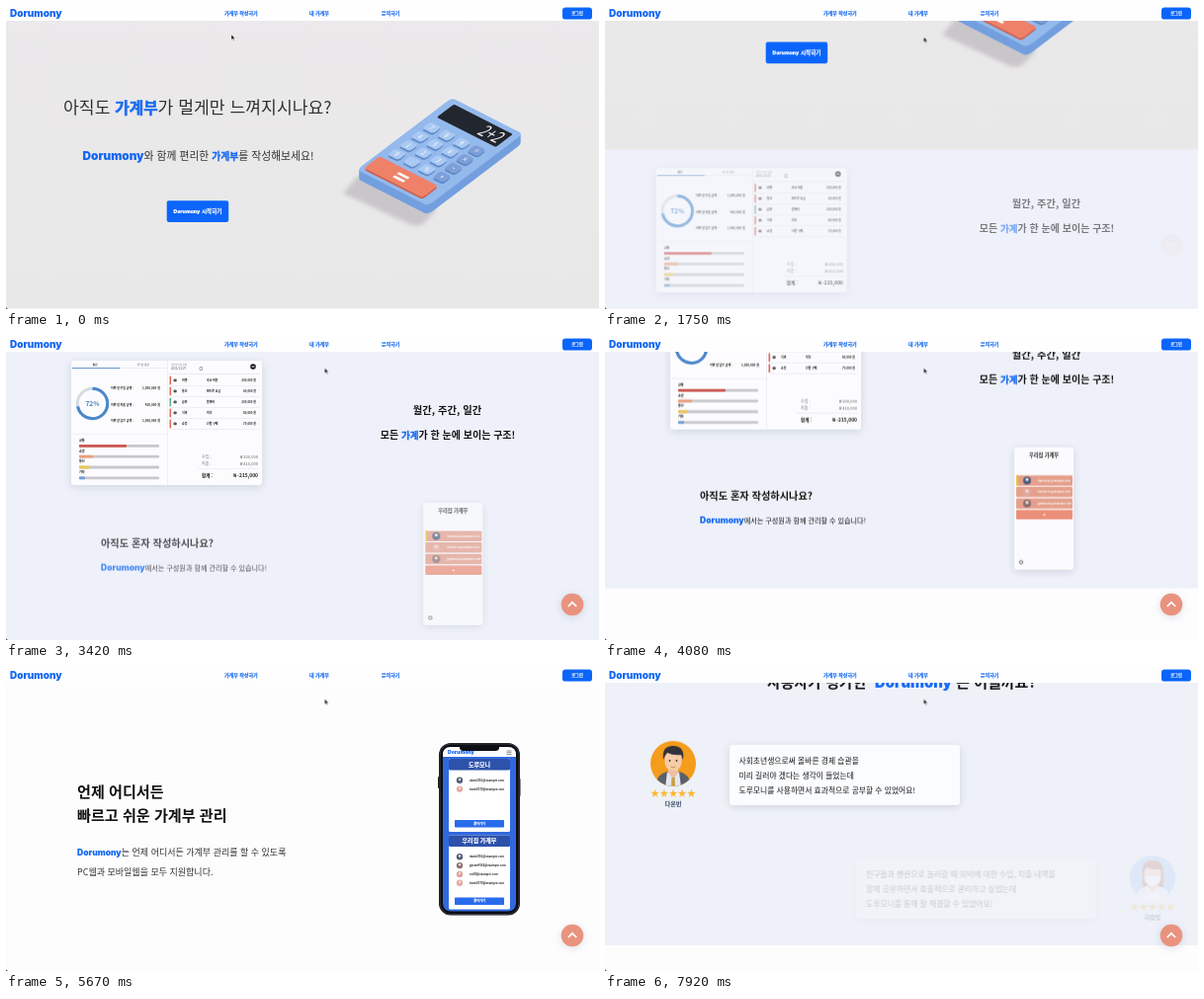
Write an HTML page that moves like this. It is 600x307 px and loops after 8 s.

```html
<!DOCTYPE html>
<html lang="ko">
<head>
<meta charset="utf-8">
<title>Dorumony</title>
<style>
html, body { margin: 0; width: 100%; height: 100%; overflow: hidden; background: #fefdfe; }
svg { display: block; width: 100vw; height: 100vh; }
text { font-family: "Noto Sans CJK KR", "Noto Sans CJK", sans-serif; }
.brand { font-family: Inter, sans-serif; font-weight: 900; fill: #1267f4; stroke: none; }
.blue { font-weight: 900; fill: #1a6cf0; stroke: #1a6cf0; stroke-width: .035em; }
.white { font-weight: 900; fill: #fff; stroke: #fff; stroke-width: .03em; }
.brand.white { fill: #fff; }
.light { font-weight: 300; fill: #303033; }
.bold { font-weight: 700; }
.panel { filter: drop-shadow(0 2px 4px #30406028); }

#page, #cursor, #up, .reveal { animation: 8s linear infinite; }
#page { animation-name: scroll; }
#cursor { animation-name: point; }
#up { animation-name: up; }
.budget { animation-name: budget; }
.group { animation-name: group; }
.mobile { animation-name: mobile; }
.first { animation-name: first; }
.second { animation-name: second; }
.right { --from: translate(-30px, 0); }
.left { --from: translate(30px, 0); }
.down { --from: translate(0, -30px); }

@keyframes scroll {
  0%, 11.25% { transform: translateY(0); }
  17.1% { transform: translateY(-65px); }
  21.9% { transform: translateY(-161px); }
  26.25%, 33.75% { transform: translateY(-195px); }
  42.75% { transform: translateY(-301px); }
  47.5% { transform: translateY(-318px); }
  51.25% { transform: translateY(-360px); }
  54.5% { transform: translateY(-450px); }
  59.4% { transform: translateY(-580px); }
  63.75%, 74.4% { transform: translateY(-602px); }
  84.75% { transform: translateY(-755px); }
  89.6% { transform: translateY(-858px); }
  92.5% { transform: translateY(-868px); }
  95.6% { transform: translateY(-872px); }
  99% { transform: translateY(-943px); }
  100% { transform: translateY(-955px); }
}
@keyframes point {
  0%, 2% { transform: translate(228px, 29px); animation-timing-function: ease-in-out; }
  11%, 100% { transform: translate(322.5px, 31.5px); }
}
@keyframes up {
  0%, 21.2% { opacity: 0; transform: translateY(-30px); animation-timing-function: ease; }
  32%, 100% { opacity: 1; transform: none; }
}
@keyframes budget {
  0%, 17.3% { opacity: 0; transform: var(--from); animation-timing-function: ease; }
  32.3%, 100% { opacity: 1; transform: none; }
}
@keyframes group {
  0%, 36.3% { opacity: 0; transform: var(--from); animation-timing-function: ease; }
  51.3%, 100% { opacity: 1; transform: none; }
}
@keyframes mobile {
  0%, 54.5% { opacity: 0; transform: var(--from); animation-timing-function: ease; }
  69.5%, 100% { opacity: 1; transform: none; }
}
@keyframes first {
  0%, 85% { opacity: 0; transform: var(--from); animation-timing-function: ease; }
  99%, 100% { opacity: 1; transform: none; }
}
@keyframes second {
  0%, 96.9% { opacity: 0; transform: var(--from); }
  100% { opacity: .26; transform: translate(22px, 0); }
}
</style>
</head>
<body>
<svg id="stage" viewBox="0 0 600 307" preserveAspectRatio="none"></svg>
<script>
const BRAND = 'Dorumony', BRAND_KO = '도루모니', BLUE = '#0b65fa';

// Text is placed by the vertical middle of its glyphs.
const text = (x, y, size, str, cls = '', fill = '#111', anchor = 'start') =>
  `<text x="${x}" y="${y + size * .36}" font-size="${size}" class="${cls}" fill="${fill}" text-anchor="${anchor}">${str}</text>`;
const span = (str, cls, size) => `<tspan class="${cls}" font-size="${size}">${str}</tspan>`;
const brand = size => span(BRAND, 'brand', size);
const rect = (x, y, w, h, fill, r = 0, extra = '') =>
  `<rect x="${x}" y="${y}" width="${w}" height="${h}" rx="${r}" fill="${fill}" ${extra}/>`;
const circle = (x, y, r, fill, extra = '') => `<circle cx="${x}" cy="${y}" r="${r}" fill="${fill}" ${extra}/>`;
const path = (d, fill, extra = '') => `<path d="${d}" fill="${fill}" ${extra}/>`;
const at = (x, y, ...parts) => `<g transform="translate(${x} ${y})">${parts.join('')}</g>`;
const reveal = (cls, ...parts) => `<g class="reveal ${cls}">${parts.join('')}</g>`;
const each = (items, draw) => items.map(draw).join('');
const range = n => [...Array(n).keys()];

function calculator() {
  const plane = 'matrix(.72 .365 -.96 .73 451 93)';
  const slab = range(10).reverse().map(i =>
    `<g transform="translate(0 ${i})"><g transform="${plane}">${rect(0, 0, 100, 100, i ? '#739fde' : '#94b9ec', 5)}</g></g>`).join('');
  const keys = each(range(16), i => {
    const col = i % 4, x = 9 + col * 21, y = 29 + (i >> 2) * 12.2;
    const top = col === 3 ? '#7f9fd8' : '#aac9f3';
    return rect(x + 1.6, y + 1.6, 15, 8.8, '#5f88c6', 3) + rect(x, y, 15, 8.8, top, 3) +
      text(x + 7.5, y + 4.4, 6, '789÷456×123−0.%+'[i], 'bold', '#eef5ff', 'middle');
  });
  return path('M341 190L356 172L436 206L424 219Q418 225 408 221Z', '#c9c6ca', 'filter="url(#soft)"') + slab +
    `<g transform="${plane}">` +
    rect(9, 4.5, 83, 18, '#22262e', 2) +
    text(74, 13.5, 16.5, '2+2', '', '#f4f6f8', 'middle') + keys +
    rect(6, 80.5, 82, 16.5, '#c95f4d', 3) + rect(4, 79, 82, 16.5, '#ef8169', 3) +
    rect(38, 84, 15, 2.4, '#fff') + rect(38, 88.5, 15, 2.4, '#fff') + '</g>';
}

function dashboard() {
  const totals = [['수입', '1,000,000'], ['지출', '410,000'], ['남은', '1,000,000']];
  const bars = [['교통', 48, '#cf5752'], ['쇼핑', 14, '#ef9c7c'], ['통신', 10, '#e9c75a'], ['기타', 6, '#6d9dd6']];
  const rows = [['여행', '숙소 비용', '200,000', '#e0685c'], ['통신', '핸드폰 요금', '60,000', '#e0685c'],
    ['급여', '알바비', '200,000', '#5fae8c'], ['식비', '외식', '80,000', '#e0685c'], ['쇼핑', '신발 구매', '70,000', '#e0685c']];
  const ring = 'fill="none" stroke-width="3"';
  return at(66, 325,
    rect(0, 0, 193, 126, '#fcfcfe', 3, 'class="panel"'),
    text(24, 4, 2.8, '월간', 'bold', '#333', 'middle'), text(73, 4, 2.8, '한 달 설정', '', '#555', 'middle'),
    rect(1, 7.5, 96, .4, '#ccd'), rect(1, 7.2, 48, .8, '#4c81c4'),
    rect(97.5, 0, .5, 126, '#dfe2ea'), rect(0, 74, 97, .5, '#dfe2ea'),
    `<circle cx="21.5" cy="43.5" r="15.2" stroke="#d4dbe4" ${ring}/>`,
    `<circle cx="21.5" cy="43.5" r="15.2" stroke="#4a88cb" ${ring} pathLength="100" stroke-dasharray="72 28" transform="rotate(-90 21.5 43.5)"/>`,
    text(21.5, 43.5, 6.6, '72%', 'bold', '#4a80bd', 'middle'),
    each(totals, ([name, sum], i) => text(40, 28 + i * 16.5, 2.9, `이번 달 ${name} 금액 :`, 'bold') +
      text(90, 28 + i * 16.5, 3, sum + ' 원', 'bold', '#222', 'end')),
    each(bars, ([name, w, color], i) => text(8, 81 + i * 10.6, 3.1, name, 'bold') +
      rect(8, 85 + i * 10.8, 81, 2.8, '#c8c7c9', .8) + rect(8, 85 + i * 10.8, w, 2.8, color, .8)),
    text(101, 4, 2.3, '이달의 지출 날짜', '', '#888'), text(101, 8.3, 2.9, '2021/11/27', '', '#444'),
    rect(130, 6.5, 2.6, 3, 'none', .4, 'stroke="#555" stroke-width=".5"'),
    circle(184, 6, 2.8, '#111'), rect(182.4, 5.6, 3.2, 1, '#fff', .5), rect(98, 13.5, 93, .4, '#ccd'),
    each(rows, ([kind, note, sum, color], i) => {
      const y = 20 + i * 11;
      return rect(99.5, y - 4.3, 1.6, 8.6, color) + rect(103.5, y - 1.4, 3.2, 2.6, '#555', .8) +
        text(112, y, 2.9, kind, 'bold') + text(137, y, 2.9, note, 'bold') +
        text(187, y, 2.9, sum + ' 원', 'bold', '#222', 'end') + rect(101, y + 5, 89, .35, '#d5d7de');
    }),
    text(132, 97.5, 4.1, '수입 :', '', '#777'), text(189, 97.5, 4.1, '₩ 200,000', '', '#666', 'end'),
    text(132, 104.5, 4.1, '지출 :', '', '#777'), text(189, 104.5, 4.1, '₩ 410,000', '', '#666', 'end'),
    rect(128, 109.5, 62, .35, '#d5d7de'),
    text(132, 116.5, 4.6, '합계 :', 'bold'), text(189, 116.5, 4.9, '₩ -215,000', 'bold', '#222', 'end'));
}

const mails = ['dami2051@example.com', 'bomi0370@example.com', 'garam4162@example.com', 'sol80@example.com'];
const tints = ['#4b5f80', '#e3aba5', '#8a6f72', '#dba39d'];
const user = (x, y, i, r, size, fill, gap) => circle(x, y, r, tints[i]) + circle(x, y - r * .25, r * .4, '#f3dccb') +
  text(x + gap, y, size, mails[i], 'bold', fill);

function groupCard() {
  return at(414, 469,
    rect(0, 0, 60, 124, '#fbfbfd', 3, 'class="panel"'),
    text(30, 8.2, 5.2, '우리집 가계부', 'bold', '#222', 'middle'),
    each(range(3), i => rect(2, 28.5 + i * 11.6, 57, 10.5, '#e5a08c', 1) +
      user(13, 33.7 + i * 11.6, i, 4, 2.6, '#fff', 11)),
    rect(2, 28.5, 1.8, 10.5, '#f0c332'),
    rect(2, 63.5, 57, 9.5, '#ec8f79', 1), text(30.5, 68.2, 5, '+', 'bold', '#fff', 'middle'),
    circle(7, 116.5, 1.7, 'none', 'stroke="#333" stroke-width=".7"'));
}

function phone() {
  const list = (y, h, title, ids) => rect(448, y, 62, h, '#fff', 1.5) +
    rect(448, y, 62, 11.5, '#2d52aa', 1.5) + text(479, y + 5.6, 6, title, 'white', '#fff', 'middle') +
    each(ids, (id, i) => user(459, y + 21.8 + i * 8.8, id, 3.2, 2.8, '#222', 10)) +
    rect(454, y + h - 12, 50, 7.5, '#286cec', .8) + text(479, y + h - 8.3, 3.2, '돌아가기', 'white', '#fff', 'middle');
  return at(0, 602,
    rect(437, 110, 2, 12, '#222', 1), rect(519, 112, 1.5, 18, '#222', 1),
    rect(438, 76, 82, 174.5, '#0d0e13', 12), rect(439, 77, 80, 172.5, 'none', 11, 'stroke="#4c5058" stroke-width=".7"'),
    rect(442, 80, 74, 166.5, '#3268de', 8),
    path('M442 90V88Q442 80 450 80H508Q516 80 516 88V90Z', '#fcfcfe'),
    text(447, 85.5, 5.1, BRAND, 'brand'), path('M459 79H499V80.5Q499 84 495 84H463Q459 84 459 80.5Z', '#0d0e13'),
    each(range(3), i => rect(506.5, 83.7 + i * 1.8, 5, .6, '#555')),
    list(92, 74, BRAND_KO, [0, 1]), list(169.5, 75, '우리집 가계부', [0, 2, 3, 1]));
}

function person(x, y, bg, hair, coat, masked) {
  return at(x, y, circle(0, 0, 23, bg),
    `<g clip-path="url(#face)">`,
    masked ? path('M-10 9V-8Q-9 -18 0 -18Q10 -18 11 -7V9Z', hair) : '',
    path('M-18 24Q-18 11 -6 8H6Q18 11 18 24Z', coat),
    path('M-5 4H5V10L0 15L-5 10Z', '#efc09c'), path('M-6 8L0 15L6 8L8 24H-8Z', masked ? '#fff' : '#e4e8ee'),
    masked ? '' : path('M-1.6 14H1.6L2 24H-2Z', '#c7a042'),
    rect(-8.5, -13, 17, 20, '#f7cda9', 8),
    path('M-10 -4Q-12 -18 0 -18Q12 -18 10 -4L8 -9Q0 -8 -6 -11Q-8 -9 -10 -4Z', hair),
    masked ? path('M-8.4 -1Q0 -4 8.4 -1Q8 7 0 8Q-8 7 -8.4 -1Z', '#fafcff') :
      circle(-3.5, -3, .9, '#333') + circle(3.5, -3, .9, '#333') + path('M-2.5 3Q0 5 2.5 3', 'none', 'stroke="#b77b5d" stroke-width=".8"'),
    '</g>');
}

const review = (x, y, w, face, faceX, name, lines) =>
  rect(x, y, w, 61, '#fbfcfe', 3, 'class="panel"') +
  each(lines, (line, i) => text(x + 9.5, y + 15.8 + i * 15.1, 7.8, line, '', '#111')) + face +
  text(faceX, y + 49, 9.2, '★★★★★', '', '#fdb62c', 'middle') + text(faceX, y + 60, 6.2, name, 'bold', '#2f405e', 'middle');

const hero = rect(0, 0, 600, 306, 'url(#sky)') +
  text(58, 102.5, 17.2, `아직도 ${span('가계부', 'blue', 15.7)}가 멀게만 느껴지시나요?`, 'light') +
  text(77.5, 152, 10.8, `${brand(11.8)}와 함께 편리한 ${span('가계부', 'blue', 9.8)}를 작성해보세요!`, 'light') +
  rect(162.7, 197.3, 62.5, 21.6, BLUE, 1.8) +
  text(194, 208, 5.6, `${span(BRAND, 'brand white', 5.1)} 시작하기`, 'white', '#fff', 'middle') + calculator();

const features = rect(0, 306, 600, 306, '#eef1f9') +
  reveal('budget right', dashboard()) +
  reveal('budget down', text(446.5, 375, 10.3, '월간, 주간, 일간', 'bold', '#111', 'middle'),
    text(447, 400, 10, `모든 ${span('가계', 'blue', 9.6)}가 한 눈에 보이는 구조!`, 'bold', '#111', 'middle')) +
  reveal('group down', text(96, 518.5, 10.2, '아직도 혼자 작성하시나요?', 'bold'),
    text(96, 543.5, 7.1, `${brand(8.5)}에서는 구성원과 함께 관리할 수 있습니다!`)) +
  reveal('group left', groupCard());

const anywhere = rect(0, 612, 600, 306, '#fefdfe') +
  reveal('mobile down', text(72, 728, 15.1, '언제 어디서든', 'bold'), text(72, 752, 15.1, '빠르고 쉬운 가계부 관리', 'bold'),
    text(72, 789, 9, `${brand(8.5)}는 언제 어디서든 가계부 관리를 할 수 있도록`, 'light'),
    text(72, 809, 9, 'PC웹과 모바일웹을 모두 지원합니다.', 'light')) + phone();

const reviews = rect(0, 918, 600, 306, '#eef1f8') +
  text(300, 957.5, 15, `사용자가 평가한&#160; ${brand(14.8)} 는 어떨까요?`, 'bold', '#111', 'middle') +
  reveal('first right', review(126, 1021, 233, person(69, 1040, '#f49c1c', '#33333b', '#5d6069', false), 69, '다온빈',
    ['사회초년생으로써 올바른 경제 습관을', '미리 길러야 겠다는 생각이 들었는데', `${BRAND_KO}를 사용하면서 효과적으로 공부할 수 있었어요!`])) +
  reveal('second left', review(230, 1136, 242, person(529.5, 1156, '#8fc5f5', '#a8523c', '#e9edf5', true), 529.5, '하람빛',
    ['친구들과 펜션으로 놀러갈 때 회비에 대한 수입, 지출 내역을', '함께 공유하면서 효율적으로 관리하고 싶었는데', `${BRAND_KO}를 통해 잘 해결할 수 있었어요!`]));

const nav = rect(0, 0, 600, 15, '#fefeff') + text(4, 7.8, 10, BRAND, 'brand') +
  text(221, 7.3, 5, '가계부 작성하기', 'blue') + text(307, 7.3, 5, '내 가계부', 'blue') + text(380, 7.3, 5, '문의하기', 'blue') +
  rect(563, 1.4, 30, 12.2, BLUE, 3.2) + text(578, 7.4, 4.2, '로그인', 'white', '#fff', 'middle');

const upButton = `<g id="up">${circle(573, 271, 11.3, '#e9937f', 'class="panel"')}` +
  path('M568.8 273L573 268.8L577.2 273', 'none', 'stroke="#fff" stroke-width="1.7"') + '</g>';

document.getElementById('stage').innerHTML = `<defs>
  <linearGradient id="sky" x2="0" y2="1"><stop stop-color="#ebe9eb"/><stop offset="1" stop-color="#e9e8e8"/></linearGradient>
  <filter id="soft"><feGaussianBlur stdDeviation="2.2"/></filter>
  <clipPath id="face"><circle r="23"/></clipPath></defs>
  <g id="page">${hero}${features}${anywhere}${reviews}</g>${upButton}${nav}
  <g id="cursor">${path('M0 0V5.2L1.3 4.1L2.2 6L3.1 5.6L2.2 3.8H3.8Z', '#111', 'stroke="#fff" stroke-width=".4"')}</g>
  ${path('M0 304.5Q0 307 2.5 307H0Z', '#111')}`;
</script>
</body>
</html>
```
